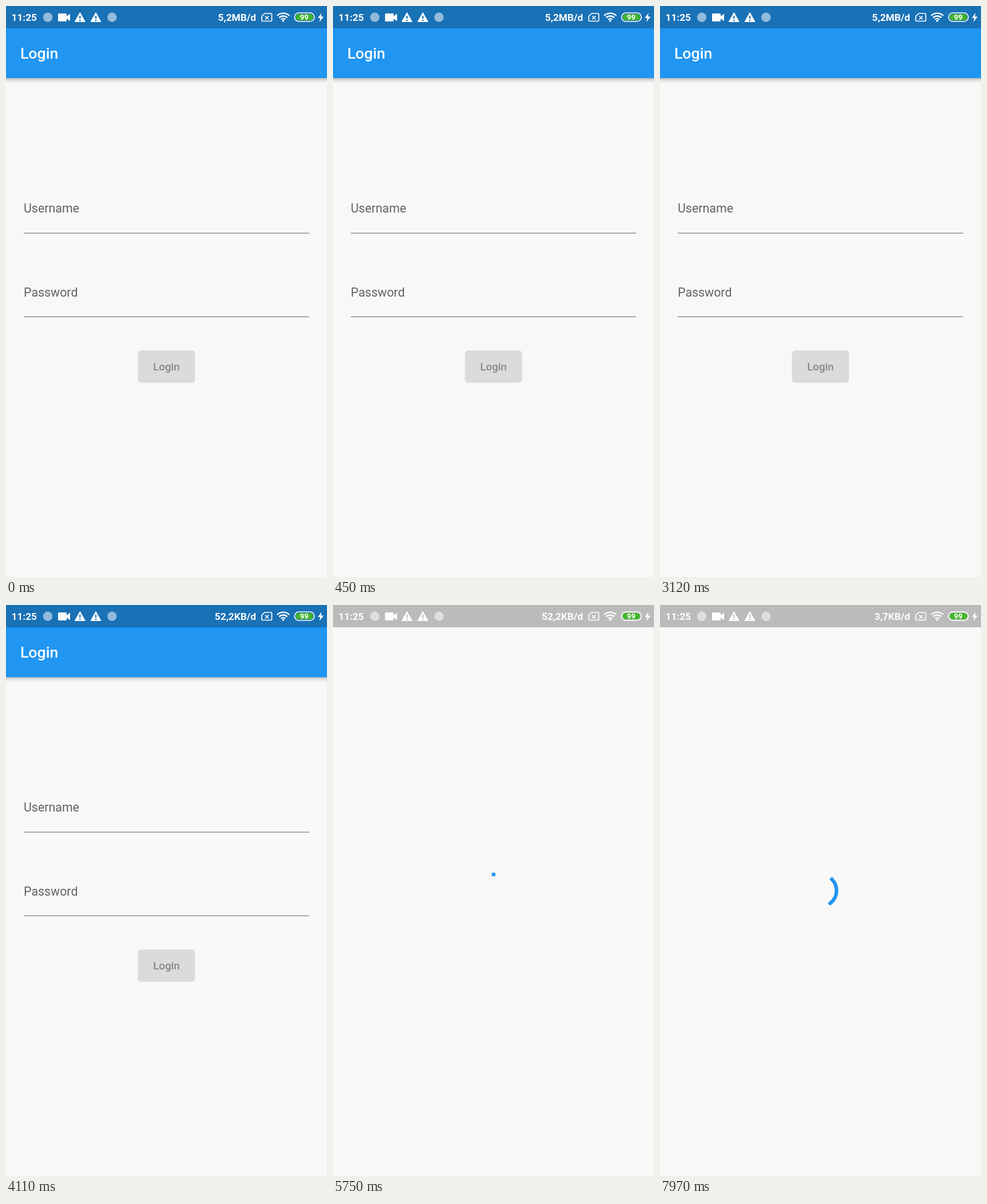
An HTML page that plays this animation: 561x998 px, repeating every 8000 ms.

```html
<!DOCTYPE html>
<html lang="en">
<head>
<meta charset="utf-8">
<style>
html, body { margin: 0; width: 100%; height: 100%; overflow: hidden; background: #f8f8f7; }
svg { display: block; width: 561px; height: 998px; font-family: Roboto, sans-serif; }
.medium { font-weight: 500; }
.status { font-size: 17.3px; font-weight: 700; fill: #fff; }
.label { font-size: 21.4px; fill: #626262; }
</style>
</head>
<body>
<svg viewBox="0 0 561 998">
  <defs>
    <linearGradient id="shade" x2="0" y2="1">
      <stop offset="0" stop-color="#000" stop-opacity=".25"/>
      <stop offset=".45" stop-color="#000" stop-opacity=".09"/>
      <stop offset="1" stop-color="#000" stop-opacity="0"/>
    </linearGradient>
    <g id="warning">
      <path d="M0-8.5L9 7.5H-9Z" fill="#fff" stroke="#fff" stroke-linejoin="round"/>
      <path d="M-1.1-3H1.1V2.3H-1.1ZM-1.1 4H1.1V6.2H-1.1Z" fill="currentColor"/>
    </g>
  </defs>

  <g id="login">
    <rect y="126" width="561" height="9" fill="url(#shade)"/>
    <rect y="39" width="561" height="87" fill="#2095f1"/>
    <text class="medium" x="24.9" y="91.6" font-size="26.7" fill="#fff">Login</text>
    <text class="label" x="31" y="361">Username</text>
    <text class="label" x="31" y="507.5">Password</text>
    <path d="M31 397H530M31 543.3H530" stroke="#939393" stroke-width="1.6"/>
    <rect x="230.5" y="602" width="100" height="56.5" rx="6" fill="#dbdbdb"/>
    <text class="medium" x="280.5" y="637" font-size="18.7" fill="#888" text-anchor="middle">Login</text>
  </g>

  <path id="spinner" fill="none" stroke="#2095f1" stroke-width="6.2" stroke-linecap="square"/>

  <g id="bar">
    <rect width="561" height="39" fill="currentColor"/>
    <text class="status" x="9.5" y="26.4">11:25</text>
    <g fill="#fff" fill-opacity=".52">
      <circle cx="73" cy="19.7" r="8.2"/>
      <circle cx="185.3" cy="19.7" r="8.2"/>
    </g>
    <path d="M92.5 13H104.5Q106 13 106 14.5V18L112 13.5V26.5L106 22V25.5Q106 27 104.5 27H92.5Q91 27 91 25.5V14.5Q91 13 92.5 13Z" fill="#fff"/>
    <use href="#warning" x="129.3" y="20"/>
    <use href="#warning" x="157" y="20"/>
    <text class="status" id="speed" x="437" y="26.4" text-anchor="end"></text>
    <g fill="none" stroke="#fff" stroke-width="1.7" stroke-linejoin="round">
      <path d="M452 13H463Q464.5 13 464.5 14.5V25Q464.5 26.5 463 26.5H448.5Q447 26.5 447 25V18ZM453 17.5L459 23.5M459 17.5L453 23.5"/>
      <path d="M473.8 17A15.4 15.4 0 0 1 495.2 17M477.3 20.4A10.4 10.4 0 0 1 491.7 20.4M480.7 23.6A5.6 5.6 0 0 1 488.3 23.6" stroke-width="2.3"/>
      <rect x="504.3" y="12" width="34.6" height="15" rx="7.5" stroke-width="1.6"/>
    </g>
    <circle cx="484.5" cy="25.8" r="1.9" fill="#fff"/>
    <rect x="506.3" y="14" width="30.6" height="11" rx="5.5" fill="#43b52b"/>
    <text x="521.2" y="24.3" font-size="13" font-weight="700" fill="#fff" text-anchor="middle">99</text>
    <path d="M551.5 12L545 21H549.3L547.8 28L555 18.5H550.4Z" fill="#fff"/>
  </g>
</svg>
<script>
const LOOP = 8000, SUBMIT = 5750, STALL = 135, RESUME = 7930;
const get = id => document.getElementById(id);
const clamp = v => Math.min(1, Math.max(0, v));

// cubic-bezier(.4, 0, .2, 1), solved by bisection
function ease(x) {
  let lo = 0, hi = 1;
  for (let i = 0; i < 20; i++) {
    const s = (lo + hi) / 2, r = 1 - s;
    if (1.2 * s * r * r + .6 * s * s * r + s ** 3 < x) lo = s; else hi = s;
  }
  return lo * lo * (3 - 2 * lo);
}

// Indeterminate progress arc: the head runs ahead, then the tail catches up
function arc(ms) {
  const phase = ms / 1333 % 1;
  const head = ease(clamp(phase * 2)), tail = ease(clamp(phase * 2 - 1));
  const start = (tail * 1.5 + ms / 2222 * 2 + phase * .5) * Math.PI;
  const end = start + Math.max((head - tail) * 1.5 * Math.PI, .001);
  const point = a => `${280.5 + 28 * Math.sin(a)} ${499 - 28 * Math.cos(a)}`;
  return `M${point(start)}A28 28 0 ${+(end - start > Math.PI)} 1 ${point(end)}`;
}

function draw(now) {
  const t = now % LOOP, loading = t >= SUBMIT;
  get('login').style.display = loading ? 'none' : '';
  get('bar').style.color = loading ? '#bbb' : '#1971b6';
  get('speed').textContent = t < 3160 ? '5,2MB/d' : t < 7070 ? '52,2KB/d' : '3,7KB/d';
  // The spinner stalls while the page is busy
  const spin = t < RESUME ? Math.min(t - SUBMIT, STALL) : 157 + t - RESUME;
  get('spinner').setAttribute('d', loading ? arc(spin) : '');
  requestAnimationFrame(() => draw(performance.now()));
}
draw(0);
</script>
</body>
</html>
```
